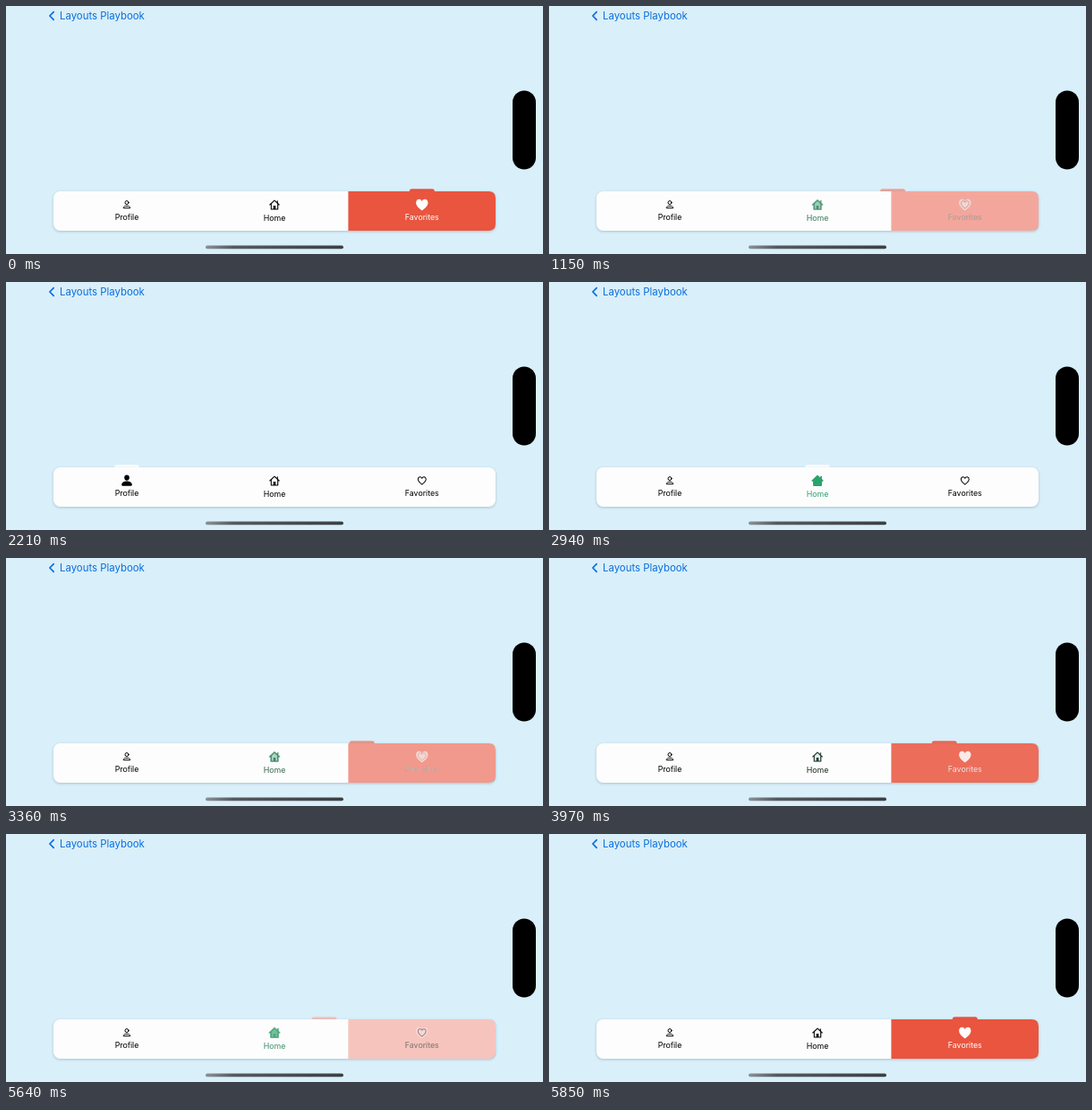
Write an HTML page that moves like this. It is 600x277 px and loops after 5.91 s.

```html
<!DOCTYPE html>
<html lang="en">
<head>
<meta charset="utf-8">
<title>Tab bar</title>
<style>
  html, body { margin: 0; width: 100%; height: 100%; overflow: hidden; background: #d9effa; }
  svg { display: block; width: 100%; height: 100%; }
  text { font-family: Inter, "Open Sans", sans-serif; }
  .label { font-size: 8.8px; text-anchor: middle; }
  .line { fill: none; stroke: currentColor; stroke-linecap: round; stroke-linejoin: round; }
  .fill { fill: currentColor; }
  #bar { filter: drop-shadow(0 1px 1.5px rgba(0, 30, 50, .22)); }
</style>
</head>
<body>
<svg viewBox="0 0 600 277">
  <defs>
    <linearGradient id="grip">
      <stop offset="0" stop-color="#8b9297"/>
      <stop offset=".2" stop-color="#555a5d"/>
      <stop offset="1" stop-color="#3c4042"/>
    </linearGradient>

    <g id="profile-off" class="line" stroke-width="1">
      <circle cy="-2.4" r="2"/>
      <path d="M-3.8 3.3C-3.8 .5 3.8 .5 3.8 3.3Z"/>
    </g>
    <g id="profile-on" class="fill">
      <ellipse cy="-3.4" rx="2.8" ry="3.1"/>
      <path d="M-5.8 4.6C-5.8-.9 5.8-.9 5.8 4.6Q5.8 5.8 4.6 5.8H-4.6Q-5.8 5.8-5.8 4.6Z"/>
    </g>

    <g id="home-off">
      <path class="line" stroke-width="1.1" d="M-5.2 0L0-4.9L5.2 0M-3.7-1V5H3.7V-1M3.3-4.2V-2"/>
      <path class="fill" d="M-1.3 5V1H1.3V5Z"/>
    </g>
    <g id="home-on" class="fill">
      <path d="M-6.6-.2L-.6-6Q0-6.5 .6-6L3.2-3.5V-5.2H4.9V-1.9L6.6-.2Q6.8 .7 5.8 .7H5V5Q5 6 4 6H-4Q-5 6-5 5V.7H-5.8Q-6.8 .7-6.6-.2Z"/>
    </g>

    <path id="heart" d="M0 6C-3.4 3.5-6.4 .9-6.4-2.4C-6.4-6.6-1.7-7.5 0-3.9C1.7-7.5 6.4-6.6 6.4-2.4C6.4 .9 3.4 3.5 0 6Z"/>
    <g id="favorites-off" class="line" stroke-width="1.45"><use href="#heart" transform="scale(.69)"/></g>
    <g id="favorites-on" class="fill"><use href="#heart" transform="translate(0 .2) scale(1.04)"/></g>
  </defs>

  <rect width="600" height="277" fill="#d9effa"/>
  <path d="M53.2 6.6L48.9 11L53.2 15.4" fill="none" stroke="#0a6fdc" stroke-width="1.7" stroke-linecap="round" stroke-linejoin="round"/>
  <text x="60" y="15" font-size="11.4" fill="#0a6fdc">Layouts Playbook</text>
  <rect x="566" y="94.5" width="26" height="88" rx="13"/>
  <rect x="223" y="267.6" width="154" height="3.6" rx="1.8" fill="url(#grip)"/>

  <g id="pills"></g>
  <rect id="bar" x="53" y="207" width="494" height="44" rx="7.5" fill="#fdfdfd"/>
  <path id="highlight" d="M382.4 207H539.5Q547 207 547 214.5V243.5Q547 251 539.5 251H382.4Z" fill="#e9553f"/>
  <g id="tabs"></g>
</svg>

<script>
const LOOP = 5910, DURATION = 350;
const [PROFILE, HOME, FAVORITES] = [0, 1, 2];
const tabs = [
  { name: "Profile", x: 135, baseline: 238.6, pill: "#fdfdfd", tint: "#000" },
  { name: "Home", x: 300, baseline: 239.5, pill: "#fdfdfd", tint: "#2ba36c" },
  { name: "Favorites", x: 464.8, baseline: 238.6, pill: "#e9553f", tint: "#fff" }
];
// Time of each tap and the tab it selects
const taps = [
  [-DURATION, FAVORITES], [978, HOME], [1860, PROFILE], [2350, HOME], [3167, FAVORITES],
  [3880, HOME], [4399, PROFILE], [5150, HOME], [5500, FAVORITES]
];

const $ = id => document.getElementById(id);

const face = ({ name, x, baseline, tint }, state) => `
  <g id="${name}-${state}" color="${state === "on" ? tint : "#000"}">
    <use href="#${name.toLowerCase()}-${state}" x="${x}" y="222"/>
    <text class="label fill" x="${x}" y="${baseline}">${name}</text>
  </g>`;

$("tabs").innerHTML = tabs.map(tab => face(tab, "off") + face(tab, "on")).join("");
$("pills").innerHTML = tabs.map(tab =>
  `<rect id="${tab.name}-pill" y="204.2" width="28" height="6" rx="2.5" fill="${tab.pill}"/>`).join("");

// cubic-bezier(.42, 0, .58, 1)
function easeInOut(x) {
  if (x >= 1) return 1;
  let low = 0, high = 1, s;
  for (let i = 0; i < 20; i++) {
    s = (low + high) / 2;
    const u = 1 - s;
    if (1.26 * u * u * s + 1.74 * u * s * s + s ** 3 < x) low = s; else high = s;
  }
  return s * s * (3 - 2 * s);
}

function draw(now) {
  const time = now % LOOP;
  const index = taps.findLastIndex(([start]) => start <= time);
  const [start, current] = taps[index];
  const previous = taps[Math.max(index - 1, 0)][1];
  const progress = easeInOut((time - start) / DURATION);
  const from = tabs[previous].x, to = tabs[current].x;
  const pillX = from + (to - from) * progress - 14;

  tabs.forEach(({ name }, i) => {
    const amount = i === current ? progress : i === previous ? 1 - progress : 0;
    $(name + "-on").setAttribute("opacity", amount);
    $(name + "-off").setAttribute("opacity", 1 - amount);
    $(name + "-pill").setAttribute("opacity", amount);
    $(name + "-pill").setAttribute("x", pillX);
    if (i === FAVORITES) $("highlight").setAttribute("opacity", amount);
  });
}

const origin = performance.now();
function tick() {
  draw(performance.now() - origin);
  requestAnimationFrame(tick);
}
tick();
</script>
</body>
</html>
```
